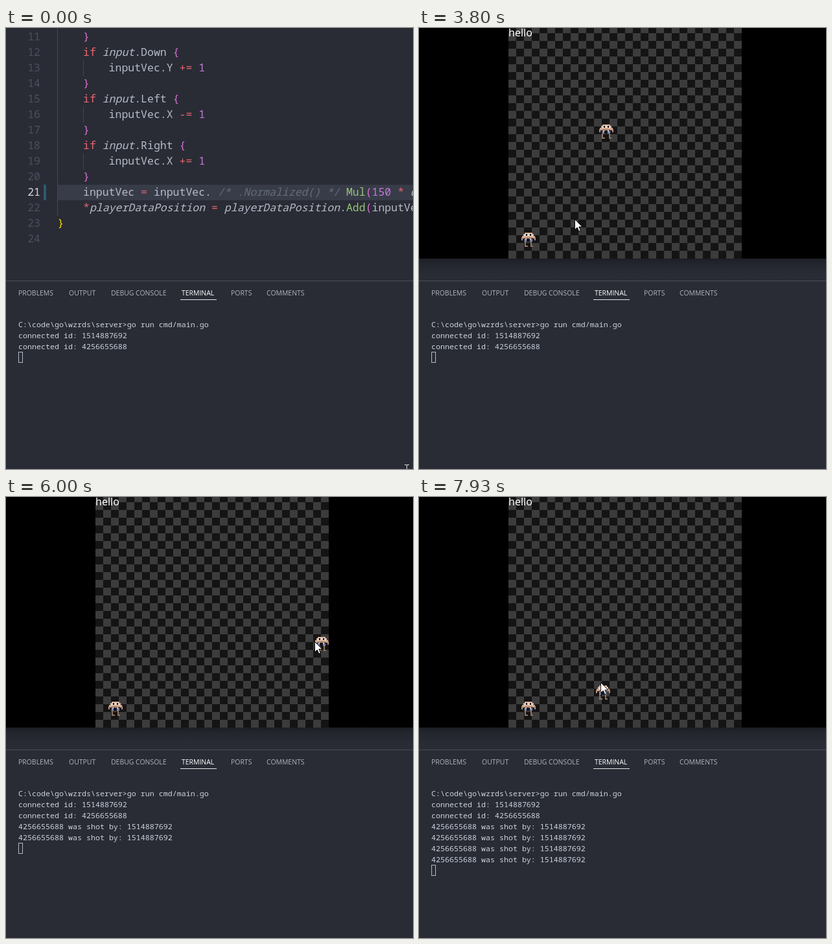
These frames come from a looping animation (628 px wide and 681 px high, 8000 ms). An HTML page:

```html
<!DOCTYPE html>
<html lang="en">
<head>
<meta charset="utf-8">
<title>Editor and game window</title>
<style>
html, body { margin: 0; width: 100%; height: 100%; overflow: hidden; background: #292c35; }
svg { display: block; width: 628px; height: 681px; }
text { white-space: pre; }
.code { font: 16.5px "Noto Sans Mono", monospace; fill: #b4bbc8; }
.term { font: 11.667px "Noto Sans Mono", monospace; fill: #ccd3df; }
.tab { font: 10.45px "Open Sans", sans-serif; fill: #b0b3bb; }
.on { fill: #fff; }
.num { text-anchor: end; fill: #495060; }
.red { fill: #e8646f; }
.fn { fill: #98c379; }
.val { fill: #c678dd; }
.br { fill: #da70d6; }
.gold { fill: #ffd700; }
.it { font-style: italic; }
.rem { font-style: italic; fill: #636b7a; }
</style>
</head>
<body>
<svg viewBox="0 0 628 681">
  <defs>
    <pattern id="cells" x="138" y="-4" width="24" height="24" patternUnits="userSpaceOnUse">
      <path fill="#3c3c3c" d="M0 0h24v24H0z"/>
      <path fill="#141414" d="M0 0h12v12H0zM12 12h12v12H12z"/>
    </pattern>
    <pattern id="hatch" x="58" y="242" width="3" height="3" patternUnits="userSpaceOnUse">
      <path fill="#2e88ab" d="M0 0h1.5v1H0zM1 1h1.5v1H1zM2 2h1v1H2zM0 2h.5v1H0z"/>
    </pattern>
    <linearGradient id="shade" x2="0" y2="1">
      <stop stop-opacity=".3"/>
      <stop offset=".4" stop-opacity=".12"/>
      <stop offset="1" stop-opacity="0"/>
    </linearGradient>
    <g id="torso" shape-rendering="crispEdges">
      <path fill="#cfa68f" d="M6 1h12v2H6zM4 3h16v6H4zM2 6h4v4H2zM18 6h4v4h-4z"/>
      <path fill="#e8cfbc" d="M7 2h10v2H7zM5 4h14v3H5z"/>
      <path fill="#17131a" d="M8 3h2v3H8zM14 3h2v3h-2zM9 11h6v4H9z"/>
      <path fill="#b88d77" d="M7 8h10v2H7zM1 8h2v5H1zM21 8h2v5h-2zM10 7h4v1h-4z"/>
      <path fill="#7885b0" d="M6 11h3v4H6zM14 11h4v4h-4z"/>
      <path fill="#c6cad8" d="M7 10h2v2H7zM14 10h2v2h-2z"/>
    </g>
  </defs>

  <rect width="628" height="681" fill="#292c35"/>
  <g id="editor">
    <rect x="80" y="242" width="548" height="24" fill="#383c48"/>
    <path stroke="#434751" d="M79.5 0V290M119.5 50v24M119.5 122v24M119.5 194v24"/>
    <rect x="58" y="242" width="4" height="24" fill="url(#hatch)"/>
  </g>

  <g id="game">
    <rect y="356" width="628" height="26" fill="url(#shade)"/>
    <rect width="628" height="356"/>
    <rect x="138" width="360" height="356" fill="url(#cells)" shape-rendering="crispEdges"/>
    <text x="138" y="13" fill="#fff" font-size="16" font-family="Noto Sans, sans-serif">hello</text>
    <g id="other"></g>
    <g id="hero"></g>
  </g>

  <path stroke="#4b4e57" d="M0 390.5H628"/>
  <g id="tabs"></g>
  <path stroke="#e7e7e7" d="M269 419.5H325"/>
  <g id="log"></g>
  <rect id="caret" x="19.5" width="6" height="16" fill="none" stroke="#b4bbc8"/>

  <path id="beam" fill="none" stroke="#dcdde0" d="M-3 -3.5H-1Q0 -3.5 0 -2.5Q0 -3.5 1 -3.5H4M.5 -3V8M-3 8.5H4"/>
  <path id="arrow" fill="#fff" stroke="#000" stroke-width=".9" d="M.5 .5V16.5L4.2 13L6.8 18.9L9.3 17.8L6.8 12H11.8Z"/>
</svg>
<script>
const $ = id => document.getElementById(id);
const LOOP = 8000, STEP = 1000 / 15;

function add(parent, tag, attrs, text) {
  const el = document.createElementNS("http://www.w3.org/2000/svg", tag);
  for (const k in attrs) el.setAttribute(k, attrs[k]);
  if (text !== undefined) el.textContent = text;
  parent.appendChild(el);
  return el;
}

// Code: a line is an indent and class/text pairs
const close = [1, "br", "}"];
const test = key => [1, "red", "if ", "it", "input", "", "." + key + " ", "br", "{"];
const step = (axis, op) => [2, "", "inputVec." + axis + " ", "red", op + " ", "val", "1"];
const lines = [
  close,
  test("Down"), step("Y", "+="), close,
  test("Left"), step("X", "-="), close,
  test("Right"), step("X", "+="), close,
  [1, "", "inputVec ", "red", "= ", "", "inputVec. ", "rem", "/* .Normalized() */ ",
    "fn", "Mul", "br", "(", "val", "150 ", "red", "* ", "it", "dt", "br", ")"],
  [1, "red", "*", "it", "playerDataPosition ", "red", "= ", "it", "playerDataPosition",
    "", ".", "fn", "Add", "br", "(", "", "inputVec", "br", ")"],
  [0, "gold", "}"],
  [0]
];
lines.forEach(([indent, ...parts], i) => {
  const n = i + 11, y = 19 + i * 24;
  const num = add($("editor"), "text", { class: "code num", x: 53, y }, n);
  if (n === 21) num.style.fill = "#d7dae0";
  const row = add($("editor"), "text", { class: "code", x: 79.4 + indent * 39.6, y });
  for (let k = 0; k < parts.length; k += 2) add(row, "tspan", { class: parts[k] }, parts[k + 1]);
});

// Panel
const tabs = { PROBLEMS: 19, OUTPUT: 97, "DEBUG CONSOLE": 162, TERMINAL: 271, PORTS: 347, COMMENTS: 402 };
for (const name in tabs) {
  add($("tabs"), "text", { class: name === "TERMINAL" ? "tab on" : "tab", x: tabs[name], y: 413 }, name);
}
const ids = ["1514887692", "4256655688"];
const shots = [4533, 5200, 6800, 7200];
const log = [
  "C:\\code\\go\\wzrds\\server>go run cmd/main.go",
  ...ids.map(id => "connected id: " + id),
  ...shots.map(() => `${ids[1]} was shot by: ${ids[0]}`)
].map((s, i) => add($("log"), "text", { class: "term", x: 19, y: 462 + i * 17 }, s));

// Characters
function makeSprite(g) {
  add(g, "use", { href: "#torso" });
  return add(g, "path", { fill: "#8d7360", "shape-rendering": "crispEdges" });
}
const legs = shift => `M${6 - shift} 15h2v6h3v2h-5zM${15 + shift} 15h2v6h2v2h-4z`;
const heroLegs = makeSprite($("hero"));
makeSprite($("other")).setAttribute("d", legs(0));

// Motion paths: time, x, y
const walk = [
  [3733, 270, 148], [3800, 277, 148], [4800, 382, 148], [5370, 445, 148], [5400, 448, 151],
  [5650, 475, 179], [6040, 475, 219], [6533, 423, 273], [6810, 393, 303],
  [7800, 286, 303], [7933, 271.5, 289.5]
];
const mouse = [
  [2200, 391, 16], [2333, 395, 62], [3067, 395, 62], [3400, 350, 150], [3667, 255, 282],
  [3800, 240, 295], [3933, 240, 295], [4500, 345, 180], [4800, 390, 165], [5400, 450, 158],
  [5667, 478, 175], [5900, 482, 215], [6533, 442, 266], [7000, 400, 300],
  [7400, 352, 304], [7800, 290, 290], [7933, 280, 286]
];

function along(path, t) {
  const i = path.findIndex(p => p[0] > t);
  if (i === 0) return path[0].slice(1);
  if (i < 0) return path[path.length - 1].slice(1);
  const [a, b] = [path[i - 1], path[i]];
  const k = (t - a[0]) / (b[0] - a[0]);
  return [1, 2].map(j => a[j] + (b[j] - a[j]) * k);
}

function place(el, pos) {
  el.style.display = pos ? "" : "none";
  if (pos) el.setAttribute("transform", `translate(${pos.map(v => Math.round(v))})`);
}

function beamAt(n) {
  if (n === 0) return [618, 678];
  if (n === 1) return [490, 677];
  return n === 17 ? [528, 516] : null;
}

function arrowAt(n, t) {
  if (n === 18) return [237, 71];
  return n >= 33 ? along(mouse, t) : null;
}

function draw(ms) {
  const n = Math.floor((ms % LOOP + 4) / STEP) % 120;
  const t = n * STEP + 1;
  const playing = n >= 10;
  $("game").style.display = playing ? "" : "none";
  $("editor").style.display = playing ? "none" : "";

  place($("hero"), along(walk, t));
  place($("other"), [157, 315]);
  heroLegs.setAttribute("d", legs(n >= 57 && n % 4 < 2 ? 1 : 0));

  const count = 3 + shots.filter(s => t >= s).length;
  log.forEach((el, i) => { el.style.display = i < count ? "" : "none"; });
  $("caret").setAttribute("y", 449.5 + count * 17);

  place($("beam"), beamAt(n));
  place($("arrow"), arrowAt(n, t));
}

const start = performance.now();
function tick() {
  draw(performance.now() - start);
  requestAnimationFrame(tick);
}
tick();
</script>
</body>
</html>
```
